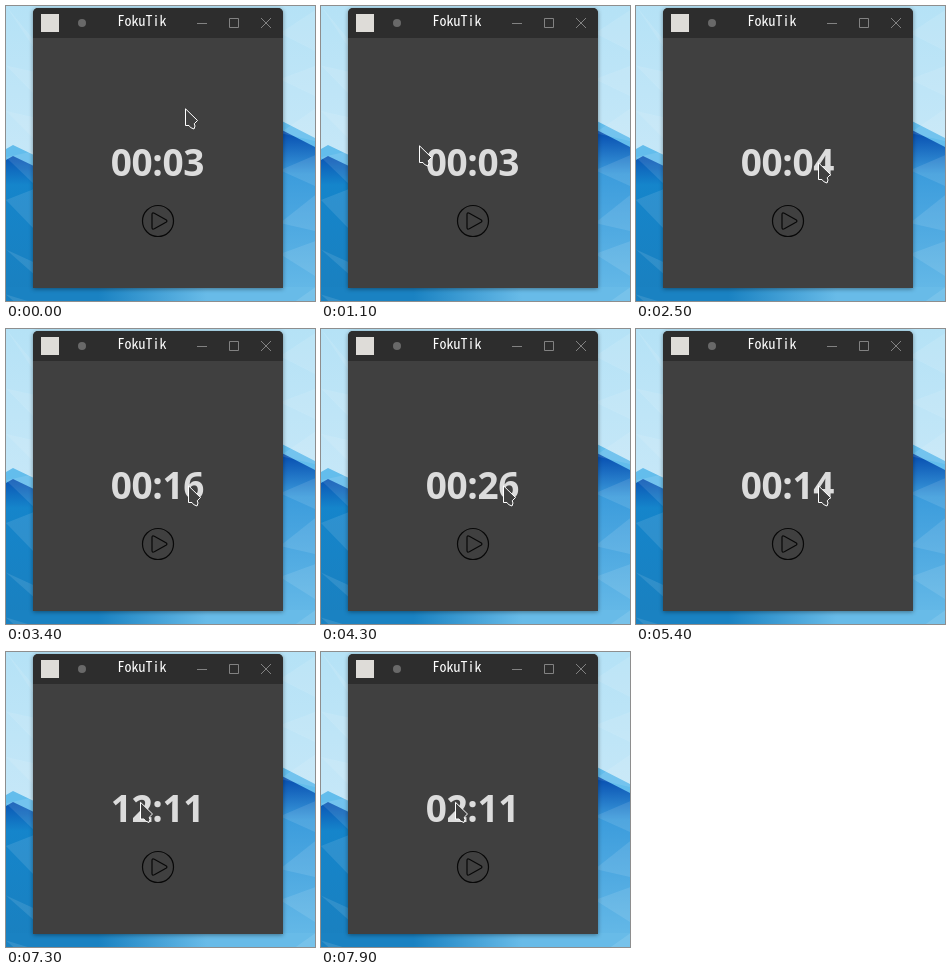
An HTML page that plays this animation: 309x295 px, repeating every 8 s.

```html
<!DOCTYPE html>
<html lang="en">
<head>
<meta charset="utf-8">
<title>FokuTik</title>
<style>
  html, body { margin: 0; width: 100%; height: 100%; overflow: hidden; }
  svg { display: block; width: 100%; height: 100%; }
  .win { filter: drop-shadow(0 1px 2px #0006); }
  .title { font: 14px "Noto Sans Mono CJK JP", "Noto Sans Mono CJK SC", "Noto Sans Mono", monospace; fill: #fff; }
  .time { font: 700 37px "Noto Sans", "Open Sans", sans-serif; letter-spacing: -.4px; fill: #dcdcdc; }
  text { text-anchor: middle; }
</style>
</head>
<body>
<svg viewBox="0 0 309 295">
  <defs>
    <linearGradient id="sky" x2="0" y2="1">
      <stop stop-color="#b5e2f6"/>
      <stop offset="1" stop-color="#c8e8f8"/>
    </linearGradient>
    <linearGradient id="left" x2="0" y2="1">
      <stop stop-color="#0b55b4"/>
      <stop offset=".2" stop-color="#1585cb"/>
      <stop offset="1" stop-color="#1a80bf"/>
    </linearGradient>
    <linearGradient id="right" x2="0" y2="1">
      <stop offset=".05" stop-color="#0b55b4"/>
      <stop offset=".27" stop-color="#3c9cdc"/>
      <stop offset="1" stop-color="#68bbe8"/>
    </linearGradient>
    <linearGradient id="floor">
      <stop offset=".3" stop-color="#1a82c2"/>
      <stop offset=".65" stop-color="#68bbe8"/>
    </linearGradient>
  </defs>

  <!-- wallpaper -->
  <rect width="309" height="170" fill="url(#sky)"/>
  <path d="M0 143L7 139L30 150V170H0zM270 112L309 132V170H270z" fill="#63bdec"/>
  <path d="M0 154L7 150L30 161V295H0z" fill="url(#left)"/>
  <path d="M270 121L309 141V295H270z" fill="url(#right)"/>
  <rect y="281" width="309" height="14" fill="url(#floor)"/>
  <g id="facets" fill="#fff" opacity=".1"></g>

  <!-- window -->
  <g class="win">
    <path d="M27 282V7a5 5 0 0 1 5-5H272a5 5 0 0 1 5 5V282z" fill="#404040"/>
    <path d="M27 32V7a5 5 0 0 1 5-5H272a5 5 0 0 1 5 5V32z" fill="#2d2d2d"/>
  </g>
  <rect x="35" y="8" width="18" height="18" fill="#dedcd8"/>
  <circle cx="76" cy="17" r="4" fill="#696969"/>
  <text class="title" x="136" y="20">FokuTik</text>
  <path d="M191 17.5H201M223.5 12.5H232.5V21.5H223.5zM255 12L265 22M265 12L255 22" fill="none" stroke="#828282"/>

  <text class="time" id="time" x="151.4" y="170">00:03</text>
  <g fill="none" stroke="#080808" stroke-width="1.2" stroke-linejoin="round">
    <circle cx="152" cy="215" r="15.5"/>
    <path d="M146 208.5Q146 206 148.3 207.2L160 213.8Q161.8 215 160 216.2L148.3 222.8Q146 224 146 221.5z"/>
  </g>
  <path id="cursor" d="M.5 .8V17.5H4L5.5 19.5L9 21L10 18L9.2 15.8L12.5 12.5z" fill="#404040" stroke="#fff" stroke-linejoin="round"/>
</svg>
<script>
const LOOP = 8000, STEP = 100;
const byId = id => document.getElementById(id);

// Pale triangles down both edges of the wallpaper
let seed = 7;
const rnd = n => (seed = seed * 16807 % 2147483647) / 2147483647 * n;
let facets = '';
for (let y = 0; y < 295; y += 45) {
  facets += `<path d="M0 ${y + rnd(20)}L30 ${y + rnd(40)}V${y + 45}z"/>`;
  facets += `<path d="M274 ${y + 20 + rnd(25)}L309 ${y + rnd(20)}V${y + 45}z"/>`;
}
byId('facets').innerHTML = facets;

// Cursor key points: [ms, x, y]
const path = [
  [100, 179, 102], [400, 64, 14], [600, 21, 88], [800, 48, 167], [1000, 90, 130], [1100, 98, 139],
  [1500, 142, 157], [1900, 187, 138], [2100, 182, 156], [5600, 182, 156], [6200, 134, 149.5]
];

// Scroll bursts over the digits: [start ms, ticks, total change]
const secBursts = [[2500, 1, 1], [2700, 3, 5], [3200, 3, 7], [3700, 3, 6], [4200, 2, 4], [5000, 2, -9], [5400, 2, -6]];
const minBursts = [[6500, 2, 5], [7000, 4, 7], [7500, 2, -8], [7900, 1, -2]];

const clamp = k => Math.min(1, Math.max(0, k));

function scrolled(from, bursts, t) {
  const sum = bursts.reduce((v, [start, n, change]) =>
    v + change * clamp(((t - start) / STEP + 1) / n), from);
  return String(Math.round(sum)).padStart(2, '0');
}

function cursorAt(t) {
  let [t0, x, y] = path[0];
  for (const [t1, x1, y1] of path.slice(1)) {
    const k = clamp((t - t0) / (t1 - t0));
    x += (x1 - x) * k;
    y += (y1 - y) * k;
    t0 = t1;
  }
  return [x, y];
}

function draw(now) {
  const t = Math.floor(now % LOOP / STEP) * STEP;
  byId('time').textContent = scrolled(0, minBursts, t) + ':' + scrolled(3, secBursts, t);
  byId('cursor').setAttribute('transform', `translate(${cursorAt(t)})`);
}

let start;
function frame(now) {
  start ??= now;
  draw(now - start);
  requestAnimationFrame(frame);
}
draw(0);
requestAnimationFrame(frame);
</script>
</body>
</html>
```
